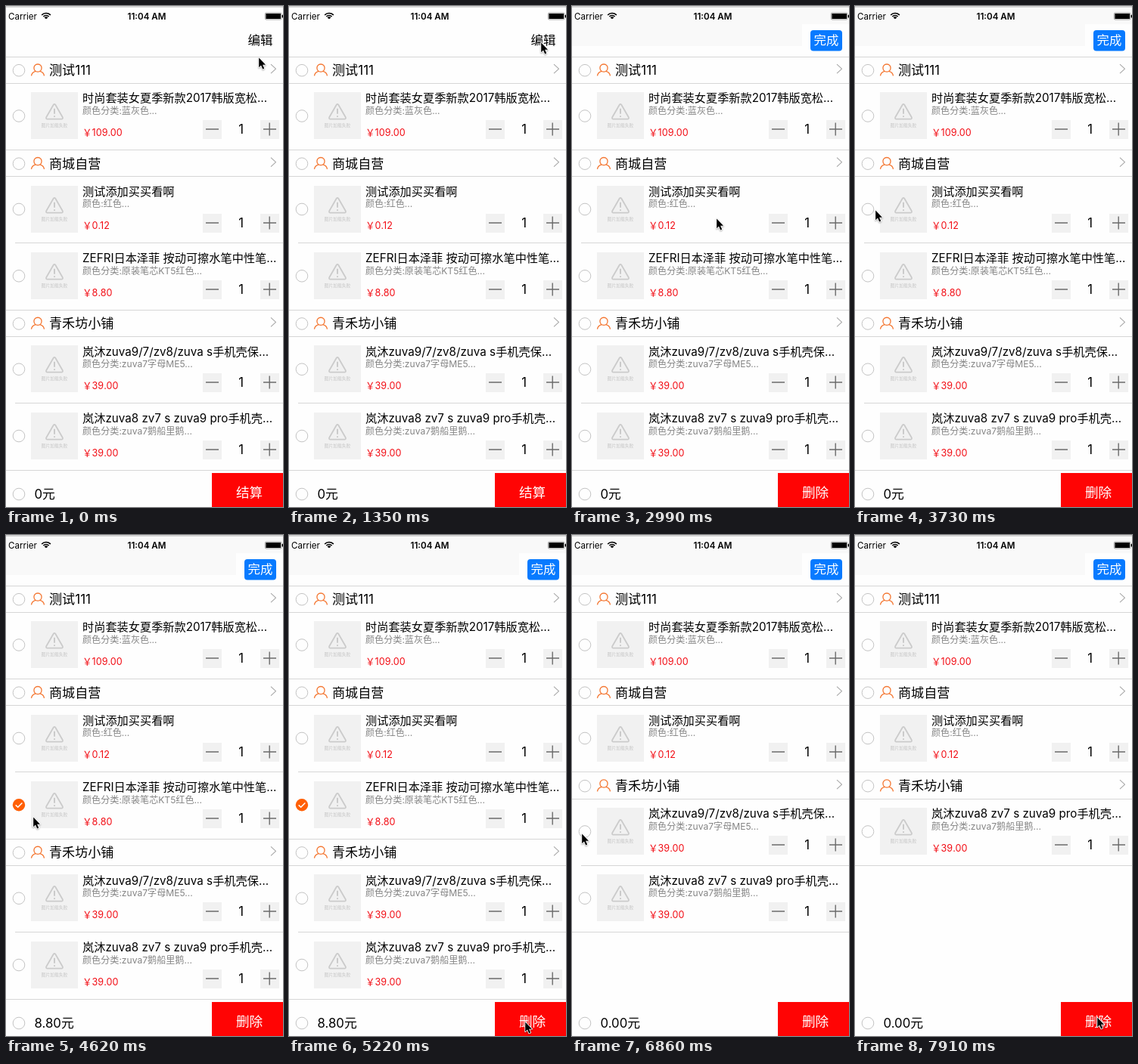
Animation, 366 px wide and 663 px high, one loop 8000 ms. Source, as an HTML page with a canvas:

```html
<!DOCTYPE html>
<html lang="zh-CN">
<head>
<meta charset="utf-8">
<title>购物车</title>
<style>
html, body { margin: 0; width: 100%; height: 100%; overflow: hidden; background: #fefefe; }
canvas { display: block; width: 366px; height: 663px; }
</style>
</head>
<body>
<canvas id="stage"></canvas>
<script>
const W = 366, H = 663, LOOP = 8000;
const HEAD = 35.2, ROW = 88.28, LIST_TOP = 67;
const FONT = 'Inter, "Noto Sans CJK SC", "Noto Sans CJK", sans-serif';
const LINE = '#d6d6d6', ORANGE = '#f4752f', RED = '#ff0404';

const canvas = document.getElementById('stage');
const dpr = window.devicePixelRatio || 1;
canvas.width = W * dpr;
canvas.height = H * dpr;
const ctx = canvas.getContext('2d');

const TIMES = { press: 1950, edit: 2100, release: 2400, check1: 4620, delete1: 5520, check2: 7160, delete2: 7910 };

const item = (title, sub, price, checkAt, deleteAt) => ({ title, sub, price, checkAt, deleteAt });
const shops = [
  { name: '测试111', items: [item('时尚套装女夏季新款2017韩版宽松…', '颜色分类:蓝灰色...', '109.00')] },
  { name: '商城自营', items: [
    item('测试添加买买看啊', '颜色:红色...', '0.12'),
    item('ZEFRI日本泽菲 按动可擦水笔中性笔…', '颜色分类:原装笔芯KT5红色...', '8.80', TIMES.check1, TIMES.delete1)
  ] },
  { name: '青禾坊小铺', items: [
    item('岚沐zuva9/7/zv8/zuva s手机壳保…', '颜色分类:zuva7字母ME5...', '39.00', TIMES.check2, TIMES.delete2),
    item('岚沐zuva8 zv7 s zuva9 pro手机壳…', '颜色分类:zuva7鹅船里鹅...', '39.00')
  ] }
];

// The pointer advances along each path in n equal jumps between two times.
const moves = [
  { from: 150, to: 750, n: 5, path: [[333, 67], [329, 58], [332, 48]] },
  { from: 1350, to: 1350, n: 1, path: [[332, 48], [332, 47]] },
  { from: 1950, to: 1950, n: 1, path: [[332, 47], [330, 43]] },
  { from: 2700, to: 3730, n: 8, path: [[330, 43], [190, 280], [60, 509], [25, 400], [26, 269]] },
  { from: 3880, to: 4170, n: 3, path: [[26, 269], [20, 315], [12, 353]] },
  { from: 4620, to: 5220, n: 5, path: [[12, 353], [35, 372], [150, 500], [260, 610], [308, 645], [311, 643]] },
  { from: 5670, to: 6560, n: 7, path: [[311, 643], [210, 500], [90, 350], [35, 304], [22, 412]] },
  { from: 6860, to: 6860, n: 1, path: [[22, 412], [12, 394]] },
  { from: 7160, to: 7610, n: 4, path: [[12, 394], [40, 415], [180, 540], [300, 630], [319, 638]] },
  { from: 7910, to: 7910, n: 1, path: [[319, 638], [319, 637]] }
];

function along(path, p) {
  const pos = p * (path.length - 1);
  const i = Math.min(Math.floor(pos), path.length - 2);
  const k = pos - i;
  return path[i].map((v, axis) => v + (path[i + 1][axis] - v) * k);
}

function pointerAt(t) {
  const move = moves.filter(m => t >= m.from).pop();
  if (!move) return moves[0].path[0];
  if (t >= move.to) return move.path[move.path.length - 1];
  const step = Math.floor((t - move.from) / (move.to - move.from) * (move.n - 1)) + 1;
  return along(move.path, step / move.n);
}

function rect(x, y, w, h, color) {
  ctx.fillStyle = color;
  ctx.fillRect(x, y, w, h);
}

function text(s, x, y, size, color = '#000', align = 'left', weight = 400) {
  ctx.font = `${weight} ${size}px ${FONT}`;
  ctx.textAlign = align;
  ctx.fillStyle = color;
  ctx.fillText(s, x, y);
}

function stroke(d, color, width) {
  ctx.strokeStyle = color;
  ctx.lineWidth = width;
  ctx.stroke(new Path2D(d));
}

function at(x, y, draw) {
  ctx.save();
  ctx.translate(x, y);
  draw();
  ctx.restore();
}

const rule = (y, x = 0) => rect(x, Math.floor(y), W - x, 1, LINE);

function checkbox(y, on) {
  ctx.beginPath();
  ctx.arc(17, y, on ? 8.2 : 7.8, 0, 7);
  if (on) {
    ctx.fillStyle = '#ff5f05';
    ctx.fill();
    at(17, y, () => stroke('M-4.3 .1 L-1.3 3 L4.4 -2.8', '#fff', 1.5));
  } else {
    ctx.strokeStyle = '#c4c4c4';
    ctx.lineWidth = 1;
    ctx.stroke();
  }
}

function header(y, name) {
  rule(y);
  rule(y + HEAD);
  checkbox(y + 18.2);
  at(42, y + 18.2, () => {
    stroke('M0 -8.2 C7 -8.2 6.5 2 0 2 C-6.5 2 -7 -8.2 0 -8.2', ORANGE, 1.3);
    stroke('M-8.5 7.2 C-8 3.6 -5.8 2 -2.8 1.2 M8.5 7.2 C8 3.6 5.8 2 2.8 1.2', ORANGE, 1.3);
  });
  text(name, 57, y + 24.2, 17.1);
  at(350, y + 16.2, () => stroke('M0 -6 L6.5 0 L0 6', '#a8a8a8', 1.1));
}

function placeholder(y) {
  rect(33, y, 62, 62, '#f1f1f1');
  at(64, y + 26, () => {
    stroke('M-1.3 -9.2 Q0 -11 1.3 -9.2 L10.8 7.3 Q11.5 9.6 9.3 9.6 H-9.3 Q-11.5 9.6 -10.8 7.3 Z', '#cbcbcb', 1.8);
    stroke('M0 -4.2 V2.8 M0 5.2 V6.9', '#cbcbcb', 2);
  });
  text('图片加载失败', 64, y + 46, 5.8, '#c6c6c6', 'center');
}

function row(y, it, t) {
  checkbox(y + 43.3, t >= it.checkAt);
  placeholder(Math.round(y + 12));
  text(it.title, 101, y + 25.2, 15.2);
  text(it.sub, 101, y + 40.8, 12.1, '#858585');
  text('￥' + it.price, 101, y + 69.8, 12.6, '#f20c14');
  const top = Math.round(y + 48.9);
  rect(260, top, 25, 25, '#f1f1f1');
  rect(336, top, 25, 25, '#f1f1f1');
  at(0, top + 12, () => stroke('M264 0 H281 M340 0 H357 M348.2 -8.5 V8.5', '#6c6c6c', 1.4));
  text('1', 310.5, y + 67, 16.6, '#000', 'center');
}

function list(t) {
  let y = LIST_TOP;
  for (const shop of shops) {
    header(y, shop.name);
    y += HEAD;
    shop.items.filter(it => !(t >= it.deleteAt)).forEach((it, i) => {
      if (i) rule(y, 12);
      row(y, it, t);
      y += ROW;
    });
  }
  rule(y);
}

function statusBar() {
  rect(0, 0, W, 2, '#d2d2d2');
  text('Carrier', 3, 17.5, 11.6);
  at(53, 17.5, () => {
    for (const r of [2, 5, 8]) {
      ctx.beginPath();
      ctx.arc(0, 0, r, -Math.PI * .76, -Math.PI * .24);
      ctx.strokeStyle = '#000';
      ctx.lineWidth = r === 2 ? 2.6 : 1.6;
      ctx.stroke();
    }
  });
  text('11:04 AM', 186, 17.5, 11.6, '#000', 'center', 600);
  ctx.beginPath();
  ctx.roundRect(342.4, 9, 21.6, 9, 1.5);
  ctx.strokeStyle = '#8a8a8a';
  ctx.lineWidth = .8;
  ctx.stroke();
  rect(343.4, 10, 19.6, 7, '#000');
  rect(364.6, 11.8, 1.4, 3.6, '#000');
}

function navBar(t) {
  const editing = t >= TIMES.edit;
  if (editing) {
    rect(0, 2, W, 22, '#f9f9f9');
    rect(0, 24, 304, 29, '#f9f9f9');
    ctx.beginPath();
    ctx.roundRect(315, 32, 42, 27.5, 4);
    ctx.fillStyle = '#077aff';
    ctx.fill();
  }
  const dimmed = t >= TIMES.press && t < TIMES.release;
  ctx.globalAlpha = dimmed ? .42 : 1;
  text(editing ? '完成' : '编辑', 336, 51, 16.4, editing ? '#fff' : '#000', 'center');
  ctx.globalAlpha = 1;
}

function total(t) {
  if (t < TIMES.check1) return '0';
  const sum = shops.flatMap(s => s.items)
    .filter(it => t >= it.checkAt && t < it.deleteAt)
    .reduce((a, it) => a + Number(it.price), 0);
  return sum.toFixed(2);
}

function footer(t) {
  checkbox(646);
  text(total(t) + '元', 37.5, 652, 16.8);
  rect(272, 618, 94, 45, RED);
  text(t >= TIMES.edit ? '删除' : '结算', 321.5, 650.3, 17.6, '#fff', 'center');
}

const arrow = new Path2D('M1.2 1.5 V14.2 L4 11.5 L6.2 16.4 L8.2 15.5 L6.1 10.7 H10 Z');

function pointer(t) {
  at(...pointerAt(t), () => {
    ctx.lineWidth = 1.7;
    ctx.strokeStyle = '#fff';
    ctx.shadowColor = 'rgba(0,0,0,.35)';
    ctx.shadowBlur = 2 * dpr;
    ctx.shadowOffsetY = dpr;
    ctx.stroke(arrow);
    ctx.shadowColor = 'transparent';
    ctx.fillStyle = '#000';
    ctx.fill(arrow);
  });
}

function draw(now) {
  const t = now % LOOP;
  ctx.setTransform(dpr, 0, 0, dpr, 0, 0);
  ctx.lineJoin = 'round';
  rect(0, 0, W, H, '#fefefe');
  navBar(t);
  statusBar();
  list(t);
  footer(t);
  pointer(t);
}

const start = performance.now();
function tick() {
  draw(performance.now() - start);
  requestAnimationFrame(tick);
}
tick();
</script>
</body>
</html>
```
